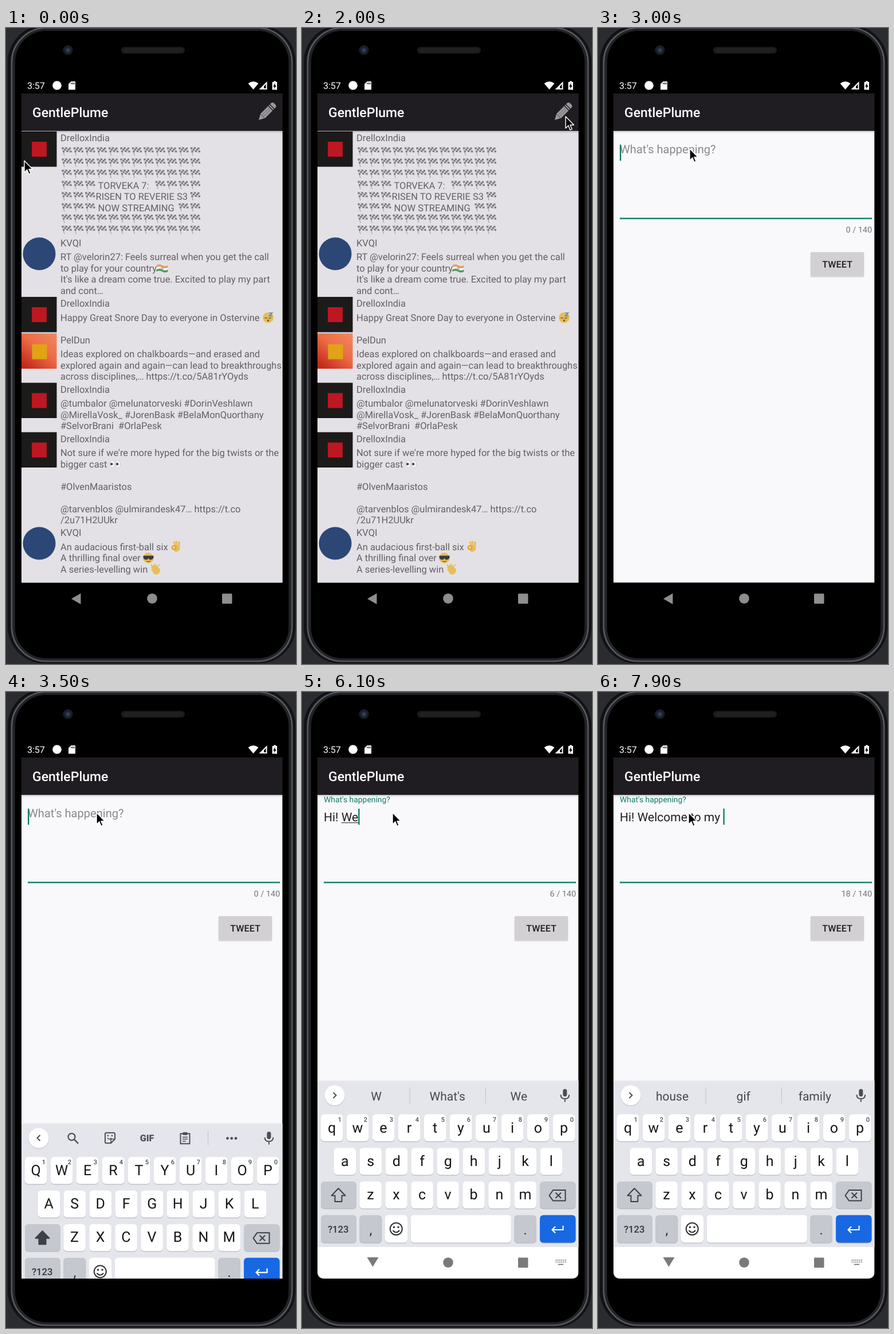
Animation, 506 px wide and 1107 px high, one loop 8 s. Source, as an HTML page:

```html
<!DOCTYPE html>
<html lang="en">
<head>
<meta charset="utf-8">
<title>GentlePlume</title>
<style>
html, body { margin: 0; width: 100%; height: 100%; overflow: hidden; background: #2a2c2f; }
svg { display: block; width: 100vw; height: 100vh; }
text { font-family: Roboto, sans-serif; white-space: pre; text-rendering: geometricPrecision; }
</style>
</head>
<body>
<svg id="stage" viewBox="0 0 506 1107" xmlns="http://www.w3.org/2000/svg"></svg>
<script>
const LOOP = 8000, STEP = 100;
const GREEN = '#117c6c', INK = '#4b4e53';

const rect = (x, y, w, h, fill, r = 0, more = '') =>
  `<rect x="${x}" y="${y}" width="${w}" height="${h}" rx="${r}" fill="${fill}" ${more}/>`;
const circle = (x, y, r, fill, more = '') =>
  `<circle cx="${x}" cy="${y}" r="${r}" fill="${fill}" ${more}/>`;
const path = (d, fill, more = '') => `<path d="${d}" fill="${fill}" ${more}/>`;
const line = (d, color, w = 2, more = '') =>
  path(d, 'none', `stroke="${color}" stroke-width="${w}" ${more}`);
const text = (x, y, size, fill, s, more = '') =>
  `<text x="${x}" y="${y}" font-size="${size}" fill="${fill}" ${more}>${s}</text>`;
const group = (id, body, more = '') => `<g id="${id}" ${more}>${body}</g>`;
const at = (x, y, body) => `<g transform="translate(${x} ${y})">${body}</g>`;
const MID = 'text-anchor="middle"', END = 'text-anchor="end"', MEDIUM = 'font-weight="500"';

function phone() {
  const ring = (x, y, w, h, r, color, sw) =>
    rect(x, y, w, h, 'none', r, `stroke="${color}" stroke-width="${sw}"`);
  return rect(0, 0, 506, 1107, '#2a2c2f') +
    rect(3, -5, 502, 1111, '#121316', 64) +
    ring(10, 0, 489, 1102, 60, '#55575d', 3) +
    ring(13.5, 3, 482, 1096, 57, '#222327', 4) +
    rect(16, 5, 477, 1092, '#000', 54) +
    rect(201, 33, 111, 11.5, '#1b1b1d', 5.7) +
    line('M207 36.500H307M205 39H309M207 41.500H307', '#303033', 1, 'stroke-dasharray="1.500 1.500"') +
    circle(108, 38.5, 9, '#14161b') + circle(108, 38.5, 7, '#1c222c') + circle(108, 38.5, 3.5, '#2d405c');
}

function statusBar() {
  return text(37, 106, 16, '#fff', '3:57') +
    circle(89, 100, 7.8, '#fff') +
    path('M113.500 93H120a1 1 0 0 1 1 1V106.500a1 1 0 0 1 -1 1H110a1 1 0 0 1 -1 -1V97.500Z', '#fff') +
    line('M114 95V98M116.500 95V98M119 95V98', '#000', 1.2) +
    path('M431.500 107L422.500 96.500Q431.500 89.500 440.500 96.500Z', '#fff') +
    path('M455.500 93V107H441.500Z', '#fff') + path('M453.500 98V105H450V101.500Z', '#000') +
    path('M467 92.500H471V94H473V107.500H464.500V94H467Z', '#fff') +
    path('M469.500 96L466 102H468.300V106L471.500 100H469.500Z', '#000');
}

function appBar() {
  return rect(27, 114, 455.5, 65, '#1f1d21') + rect(27, 179, 455.5, 1.5, '#000', 0, 'opacity=".22"') +
    rect(27, 180.5, 455.5, 2, '#000', 0, 'opacity=".07"') +
    text(46, 155, 23, '#fff', 'GentlePlume', MEDIUM);
}

const pencil = at(441, 160, '<g transform="rotate(-45)">' +
  path('M0 0L9 -5V5Z', '#9b9b9b') + rect(9.5, -5.5, 19, 11, '#9b9b9b') +
  line('M9.500 -1.800H28M9.500 1.800H28', '#555', .8) +
  rect(30, -5.5, 2, 11, '#9b9b9b') + path('M33.500 -5.500H36Q39.500 -5.500 39.500 0T36 5.500H33.500Z', '#9b9b9b') + '</g>');

// Emoji
const face = circle(0, 0, 9.3, '#e8bd55');
const emoji = {
  sleep: face + line('M-6 0q2 2 4 0M1 0q2 2 4 0', '#75572c', 1.3) + circle(0, 5, 1.8, '#75572c') +
    line('M2 -8H7L2 -3H7', '#4c82c4', 1.5),
  cool: face + path('M-9 -4H9V-1Q8 3 4 3T0 -1Q0 3 -4 3T-9 -1Z', '#3b3a3c') +
    line('M-3 5.500q3 2 6 -.500', '#75572c', 1.3),
  eyes: [-5, 5].map(x => `<ellipse cx="${x}" cy="0" rx="4" ry="6.500" fill="#f7f7f7" stroke="#c4c2c6" stroke-width=".8"/>` +
    circle(x - 1.3, 0, 2.3, '#4e4a4a')).join(''),
  okay: line('M-1 -1Q-1 -7 -3 -8M2 -1Q3 -7 1 -9M5 1Q7 -5 6 -8', '#e8bd55', 3, 'stroke-linecap="round"') +
    path('M-1 0Q5 -4 7 1T1 9Q-3 8 -4 4Z', '#e8bd55') + circle(-3, 1.5, 3.3, 'none', 'stroke="#dca945" stroke-width="2.400"'),
  clap: line('M-6 -4L2 5M-3 -6L4 3M1 -6L6 2', '#e8bd55', 3.4, 'stroke-linecap="round"') +
    path('M-8 0Q-5 -2 -2 0L6 -3Q9 3 6 7T-3 8Z', '#e8bd55') + line('M-8 -8l2 2M-2 -10v2.500M7 -8l-2 2', '#d5a53e', 1.2),
  nation: path('M-10 -5Q-5 -8 0 -5T10 -5V-1Q5 2 0 -1T-10 -1Z', '#e99b50') +
    path('M-10 -1.500Q-5 -4.500 0 -1.500T10 -1.500V2.500Q5 5 0 2.500T-10 2.500Z', '#f4f4f2') +
    path('M-10 2.500Q-5 -.500 0 2.500T10 2.500V6Q5 9 0 6T-10 6Z', '#4d9a5a') +
    circle(0, .5, 1.7, 'none', 'stroke="#5b63a0" stroke-width=".8"')
};

function raceFlag() {
  let s = line('M2.500 -6.500L7 8', '#aaa8ab', 1.3) + path('M2 -6Q7 -9 10 -6T18 -6L19.500 2Q15 4 12 1.500T5 2Z', '#d2d0d2');
  for (let r = 0; r < 3; r++) for (let c = 0; c < 5; c++)
    if ((r + c) % 2 == 0) s += rect(2.5 + c * 3.1 + r * .8, -6.5 + r * 2.8 + (c % 4 ? 0 : .5), 3.1, 2.8, '#77757a');
  return s;
}

function raceRows() {
  const tail = { 3: 8, 4: 11, 5: 10 };
  let s = '';
  for (let r = 0; r < 8; r++) for (let c = 0; c < 12; c++)
    if (!tail[r] || c < 3 || c >= tail[r])
      s += `<use href="#flag" x="${95 + c * 20.4}" y="${214 + r * 19.5}"/>`;
  return s;
}

const avatars = {
  show: y => rect(27, y, 61.5, 61.5, '#1c1b1a') + rect(45, y + 18, 26, 26, '#bd1722'),
  sport: y => circle(58, y + 30, 28.5, '#2c4776'),
  earth: y => rect(27, y, 61.5, 61.5, 'url(#warm)') + rect(45.5, y + 19, 26, 26, '#e0a416')
};

const posts = [
  ['show', 180, 'DrelloxIndia', 196.5, ['', '', '']],
  ['sport', 363, 'KVQI', 379.5, ['RT @velorin27: Feels surreal when you get the call', 'to play for your country',
    "It's like a dream come true. Excited to play my part", 'and cont…']],
  ['show', 468, 'DrelloxIndia', 485, ['Happy Great Snore Day to everyone in Ostervine']],
  ['earth', 531.5, 'PelDun', 548.5, ['Ideas explored on chalkboards—and erased and',
    'explored again and again—can lead to breakthroughs', 'across disciplines,… https://t.co/5A81rYOyds']],
  ['show', 617.5, 'DrelloxIndia', 634.5, ['@tumbalor @melunatorveski #DorinVeshlawn',
    '@MirellaVosk_ #JorenBask #BelaMonQuorthany', '#SelvorBrani  #OrlaPesk']],
  ['show', 703.5, 'DrelloxIndia', 720.5, ["Not sure if we're more hyped for the big twists or the", 'bigger cast', '',
    '#OlvenMaaristos', '', '@tarvenblos @ulmirandesk47… https://t.co', '/2u71H2UUkr']],
  ['sport', 867, 'KVQI', 884, ['An audacious first-ball six', 'A thrilling final over', 'A series-levelling win']]
];

function feed() {
  const color = '#626064', row = (x, y, s) => text(x, y, 16.45, color, s);
  return rect(27, 179, 455.5, 786.5, '#e3e1e5') +
    posts.map(([kind, top, name, y, lines]) => avatars[kind](top) + row(95, y, name) +
      lines.map((s, i) => s && row(95, y + 24.5 + i * 19.5, s)).join('')).join('') +
    raceRows() +
    row(160.5, 279.5, 'TORVEKA 7:') + row(156.5, 299, 'RISEN TO REVERIE S3') + row(160.5, 318.5, 'NOW STREAMING') +
    at(272.5, 418, emoji.nation) + at(457.5, 504, emoji.sleep) + at(190.5, 759, emoji.eyes) +
    at(296, 903, emoji.okay) + at(248.5, 922.5, emoji.cool) + at(261, 942, emoji.clap);
}

function composer() {
  return rect(27, 179, 455.5, 786.5, '#f9f8fb') +
    text(38, 218, 20.1, '#89888c', "What's happening?", 'id="hint"') +
    text(38, 192, 13.9, GREEN, "What's happening?", 'id="label"') +
    text(38, 225, 21, '#1f1f21', '', 'id="entry"') +
    rect(38, 227, 0, 1.1, '#333', 0, 'id="under"') +
    rect(38, 203, 2.4, 28, GREEN, 0, 'id="caret"') +
    rect(38, 330.3, 440, 2.4, GREEN) +
    text(478, 356, 14.4, '#757478', '0 / 140', `id="count" ${END}`) +
    rect(370.5, 390.5, 94, 43.5, '#000', 3, 'opacity=".13"') + rect(371, 390, 93, 42, '#d2d0d3', 2) +
    text(417.7, 417.3, 16, '#1c1b1d', 'TWEET', `${MEDIUM} ${MID} letter-spacing=".2"`);
}

function tools() {
  const b = `stroke-linejoin="round" stroke-linecap="round"`;
  return line('M59.500 697L54.500 702L59.500 707', INK, 2) +
    circle(114.5, 700, 6, 'none', `stroke="${INK}" stroke-width="2.200"`) + line('M119 704.500L126 711.500', INK, 2.5) +
    line('M190 698V695q0 -2 -2 -2H175q-2 0 -2 2V709q0 2 2 2H183L190 704V698', INK, 2, b) +
    line('M183 711V704H190', INK, 1.6) + circle(178, 698, 1.3, INK) + circle(185, 698, 1.3, INK) + line('M177 702q4 4 7 0', INK, 1.6) +
    text(246, 708, 16, INK, 'GIF', `font-weight="900" ${MID}`) +
    line('M304.500 694.500H320.500V712H304.500Z', INK, 2, b) + rect(308.5, 692, 8, 5, INK, 1) +
    line('M308 700.500H317M308 704H317M308 707.500H314', INK, 1.6) +
    rect(352, 689, 1.2, 26, '#c6c8cd') +
    [386.5, 393.7, 401].map(x => circle(x, 702.5, 2.4, INK)).join('');
}

function keyRow(chars, x0, y, up) {
  return [...chars].map((c, i) => text(x0 + i * 45, y, 25, '#151517', up ? c.toUpperCase() : c, MID)).join('');
}

const letters = up => keyRow('qwertyuiop', 52, 766.5, up) + keyRow('asdfghjkl', 74.7, 824.5, up) +
  keyRow('zxcvbnm', 119.5, 883, up) +
  path('M63.500 864L75.500 876.500H69.500V887H57.500V876.500H51.500Z', up ? '#3d4044' : 'none',
    'stroke="#3d4044" stroke-width="2" stroke-linejoin="round"');

function keyboard() {
  const grey = '#c5c8ce';
  const key = (x, y, w, h = 47, fill = '#fff') => rect(x, y + 1.3, w, h, '#b7bac0', 6) + rect(x, y, w, h, fill, 6);
  const rowOf = (n, x, y) => Array.from({ length: n }, (_, i) => key(x + i * 45, y, 38.5)).join('');
  const nums = [...'1234567890'].map((c, i) => text(66 + i * 45, 747.5, 11, '#4a4c50', c, `${MID} ${MEDIUM}`)).join('');
  let dots = '';
  for (let i = 0; i < 12; i++) dots += rect(442.5 + i % 6 * 3.3, 988 + (i / 6 | 0) * 3.4, 1.8, 1.8, '#77777a');
  return path('M27 677H482.500V1009Q482.500 1021 470.500 1021H39Q27 1021 27 1009Z', '#fff') +
    rect(27, 677, 455.5, 289, '#e4e6eb') + rect(27, 676, 455.5, 1, '#eeeff2') +
    circle(57, 703, 18, '#c9ccd1') + circle(57, 702, 17.5, '#fff') +
    group('tools', tools()) +
    group('words', line('M54.500 697L59.500 702L54.500 707', INK, 2) +
      rect(187.5, 688, 1.2, 28, '#c3c5ca') + rect(319.5, 688, 1.2, 28, '#c3c5ca') +
      [129.5, 253.7, 378.3].map(x => text(x, 710.5, 21, '#45484d', '', `class="word" ${MID}`)).join('')) +
    rect(455.3, 691, 7, 13, INK, 3.5) + line('M451.500 701q0 7 7.300 7t7.300 -7M458.800 708V713.500', INK, 2) +
    rowOf(10, 33, 735) + rowOf(9, 55.5, 793.5) + rowOf(7, 100.3, 852) + nums +
    key(33, 852, 62, 47, grey) + key(415, 852, 62.5, 47, grey) +
    line('M438 867H459.500V885.500H438L431.500 876.300Z', '#3d4044', 2, 'stroke-linejoin="round"') +
    line('M442.500 871.500L452 881M452 871.500L442.500 881', '#3d4044', 2) +
    key(33, 910.5, 62, 48, grey) + text(63.3, 941, 16.7, '#33363a', '?123', `${MID} ${MEDIUM}`) +
    key(100.3, 910.5, 39, 48, grey) + text(120, 944, 23, '#222', ',', MID) +
    key(145, 910.5, 39, 48) + circle(164.3, 934.5, 10.5, 'none', 'stroke="#303236" stroke-width="2"') +
    circle(160.5, 931.5, 1.7, '#303236') + circle(168, 931.5, 1.7, '#303236') +
    line('M158.500 937q5.800 7 11.600 0', '#303236', 2) +
    key(189.7, 910.5, 175, 48) + key(370, 910.5, 39, 48, grey) + text(389.5, 944, 23, '#222', '.', MID) +
    key(415, 910.5, 62.5, 48, '#1868e3') +
    line('M455.500 929V936H437M442 930.500L436.500 936L442 941.500', '#fff', 2.2) +
    group('small', letters(false)) + group('caps', letters(true)) +
    path('M113.500 984H133.500L123.500 1000.500Z', '#7a797c') + circle(255, 993, 8.8, '#7a797c') +
    rect(377, 984.5, 17.5, 17.5, '#7a797c', 1.5) + dots + rect(447, 995.5, 9, 1.8, '#77777a');
}

const stage = document.getElementById('stage');
stage.innerHTML = `<defs><clipPath id="screen"><rect x="27" y="84" width="455.500" height="937"/></clipPath>
  <clipPath id="page"><rect x="27" y="114" width="455.500" height="851.500"/></clipPath>
  <linearGradient id="warm" x1="1" y1="0" x2=".2" y2="1"><stop offset="0" stop-color="#ef8a61"/>
  <stop offset=".5" stop-color="#ec6b45"/><stop offset="1" stop-color="#c4291c"/></linearGradient>
  <g id="flag">${raceFlag()}</g></defs>` +
  phone() + statusBar() +
  group('list', feed() + appBar() + circle(455, 147, 22, '#fff', 'id="ripple" opacity=".16"') + pencil) +
  `<g clip-path="url(#page)">${group('compose', composer() + appBar())}</g>` +
  path('M114 993.500L130.500 984V1003Z', '#8e8e8e') + circle(255, 993, 8.8, '#8e8e8e') + rect(377, 984.5, 17.5, 17.5, '#8e8e8e', 1.5) +
  `<g clip-path="url(#screen)">${group('keys', keyboard())}</g>` +
  group('mouse', path('M0 0V17L4 13.200L6.600 19.500L9.200 18.400L6.600 12.300H12Z', '#000',
    'stroke="#fff" stroke-width="1.200" stroke-linejoin="round"'));

const el = {};
stage.querySelectorAll('[id]').forEach(n => el[n.id] = n);
const words = [...stage.querySelectorAll('.word')];
const pen = document.createElement('canvas').getContext('2d');
pen.font = '21px Roboto, sans-serif';
const width = s => pen.measureText(s).width;

const message = 'Hi! Welcome to my ';
const strokes = [4100, 4400, 5100, 5800, 5900, 6100, 6200, 6400, 6500, 6600, 6800, 6900, 7000, 7200, 7300, 7400, 7600, 7700];
const guesses = [[4200, 'H Hi Hey'], [4500, 'Hi His Him'], [5200, ''], [6100, "W What's We"], [6300, 'Wel Well We'],
  [6500, 'Welc Welcome Welch'], [6700, 'Welcome Welcomed Well'], [7000, 'to back and'], [7100, 't to the'],
  [7400, 'the my you'], [7600, 'm my me'], [7700, 'my may mine'], [7900, 'house gif family']];
const route = [[200, 32, 231], [400, 120, 219], [600, 330, 184], [800, 476, 161], [900, 471, 160], [1200, 462, 156],
  [2000, 460, 154], [2400, 458, 160], [2600, 425, 184], [2800, 270, 202], [3000, 160, 210], [3200, 158, 210]];

const clamp = x => Math.max(0, Math.min(1, x));
const easeOut = x => 1 - (1 - clamp(x)) ** 3;
const show = (n, on) => n.setAttribute('display', on ? 'inline' : 'none');

function pointer(t) {
  const i = route.findIndex(p => p[0] > t);
  if (i < 0) return route[route.length - 1].slice(1);
  if (i == 0) return route[0].slice(1);
  const [a, b] = [route[i - 1], route[i]], k = (t - a[0]) / (b[0] - a[0]);
  return [a[1] + (b[1] - a[1]) * k, a[2] + (b[2] - a[2]) * k];
}

function draw(t) {
  const [mx, my] = pointer(t);
  el.mouse.setAttribute('transform', `translate(${mx} ${my}) scale(1.2)`);
  show(el.ripple, t >= 2100 && t < 2400);

  const open = easeOut((t - 2200) / 400), scale = .88 + .12 * open;
  show(el.list, open < 1);
  show(el.compose, open > 0);
  el.compose.setAttribute('opacity', open);
  el.compose.setAttribute('transform', `translate(255 540) scale(${scale}) translate(-255 -540)`);

  const rise = easeOut((t - 3300) / 500);
  show(el.keys, rise > 0);
  el.keys.setAttribute('transform', `translate(0 ${(1 - rise) * 344})`);

  const n = strokes.filter(s => s <= t).length, typed = message.slice(0, n), end = width(typed);
  el.entry.textContent = typed;
  el.count.textContent = `${n} / 140`;
  show(el.hint, n == 0);
  show(el.label, n > 0);
  el.caret.setAttribute('x', 38 + end);
  show(el.caret, t >= 2600 && !(t >= 3200 && t < 3400));

  // The composing underline lingers briefly after a space
  const word = typed.trimEnd(), start = word.lastIndexOf(' ') + 1;
  const composing = t > 4100 && n > 0 && !word.endsWith('!') && (!typed.endsWith(' ') || t - strokes[n - 1] < 200);
  el.under.setAttribute('x', 38 + width(word.slice(0, start)));
  el.under.setAttribute('width', composing ? width(word.slice(start)) : 0);

  const guess = guesses.filter(g => g[0] <= t).pop(), list = guess && guess[1] ? guess[1].split(' ') : null;
  show(el.words, list);
  show(el.tools, !list);
  words.forEach((w, i) => w.textContent = list ? list[i] : '');

  const caps = n == 0 || n == 4;
  show(el.caps, caps);
  show(el.small, !caps);
}

const begin = performance.now();
function frame() {
  const t = (performance.now() - begin) % LOOP;
  draw(Math.floor(t / STEP) * STEP);
  requestAnimationFrame(frame);
}
draw(0);
requestAnimationFrame(frame);
</script>
</body>
</html>
```
